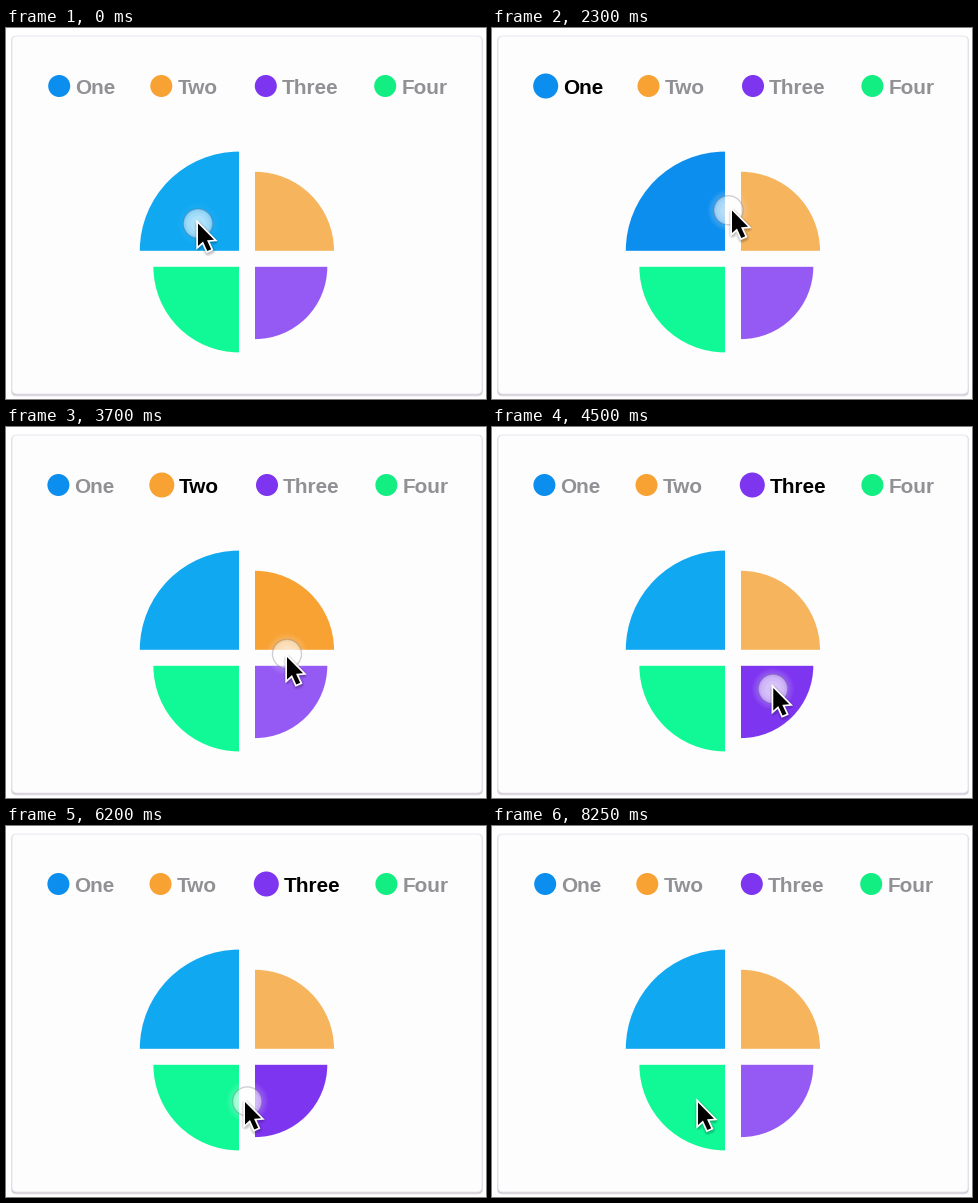
A matplotlib script that plays this animation: 480 by 371 pixels, repeating every 8.3 s.

```python
import numpy as np
import matplotlib.pyplot as plt
from matplotlib.animation import FuncAnimation
from matplotlib.colors import to_rgb
from matplotlib.patches import Circle, FancyBboxPatch, Polygon, Wedge

W, H, DPI = 480, 371, 100
STEP, LOOP = 50, 8300
PX = 72 / DPI  # points per pixel

GREY, BLACK = "#919094", "#000000"
CENTER, HALF_GAP = np.array([241, 230.8]), 8
LEGEND_Y, DOT, LABEL_GAP = 58, 11, 16
PRESS, RELEASE, FADE, LAG = 850, 7950, 300, 35

# label, soft colour, strong colour, slice radius, legend x; clockwise
ITEMS = [
    ("One", "#11a8f2", "#0c8eee", 99.2, 53.2),
    ("Two", "#f6b45c", "#f7a233", 79, 155.3),
    ("Three", "#965af4", "#7d35f0", 72.3, 259.8),
    ("Four", "#11f896", "#13ee82", 85.6, 379.2),
]

# time, x, y of the pointer; equal neighbours are rests
PATH = np.array([
    (0, 192, 195.5), (1850, 192, 195.5), (2300, 240, 182.5),
    (2850, 281, 211), (3400, 281, 211), (3700, 281, 230),
    (4000, 281, 262), (4450, 281, 262), (5000, 293, 220.5),
    (5200, 293, 220.5), (5700, 278, 258), (6200, 239, 276),
    (6900, 206, 276.5), (LOOP, 206, 276.5)])

ARROW = np.array([(0, 0), (0, 22.5), (5, 18), (9.3, 27.5), (13.2, 25.8),
                  (9, 16.8), (16, 16.2)])


def ease(u):
    u = min(max(u, 0), 1)
    return u * u * (3 - 2 * u)


def mix(a, b, u):
    return (1 - u) * np.array(to_rgb(a)) + u * np.array(to_rgb(b))


def velocity(i):
    """Path velocity at a key; zero at the ends and next to a rest."""
    if i in (0, len(PATH) - 1):
        return np.zeros(2)
    before, here, after = PATH[i - 1:i + 2]
    if (before[1:] == here[1:]).all() or (after[1:] == here[1:]).all():
        return np.zeros(2)
    return (after[1:] - before[1:]) / (after[0] - before[0])


def pointer(t):
    """Cubic Hermite curve through the path keys."""
    t = max(t, 0)
    i = min(np.searchsorted(PATH[:, 0], t, side="right") - 1, len(PATH) - 2)
    span = PATH[i + 1, 0] - PATH[i, 0]
    u = (t - PATH[i, 0]) / span
    blend = ease(u)
    return ((1 - blend) * PATH[i, 1:] + blend * PATH[i + 1, 1:]
            + u * (1 - u) ** 2 * span * velocity(i)
            - u * u * (1 - u) * span * velocity(i + 1))


def hovered(point):
    """Index of the quadrant under a point, None inside the gap."""
    dx, dy = point - CENTER
    if min(abs(dx), abs(dy)) < HALF_GAP:
        return None
    return int(dx > 0) if dy < 0 else 3 - int(dx > 0)


def find_picks():
    """Times at which the pointer enters a new slice, then the release."""
    picks, current = [], None
    for t in range(PRESS, RELEASE, STEP // 2):
        item = hovered(pointer(t))
        if item not in (None, current):
            picks.append((t, item))
            current = item
    return picks + [(RELEASE, None)]


PICKS = find_picks()


def weights(t):
    """How strongly each item is selected at time t."""
    w = np.zeros(len(ITEMS))
    for start, pick in PICKS:
        goal = np.arange(len(ITEMS)) == (-1 if pick is None else pick)
        w = w + ease((t - start) / FADE) * (goal - w)
    return w


fig = plt.figure(figsize=(W / DPI, H / DPI), dpi=DPI, facecolor="white")
ax = fig.add_axes([0, 0, 1, 1])
ax.set_xlim(0, W)
ax.set_ylim(H, 0)
ax.axis("off")


def card(grow, drop, color, alpha=1.0, edge="none"):
    ax.add_patch(FancyBboxPatch(
        (6 - grow, 8), 470 + 2 * grow, 358 + drop,
        boxstyle="round,pad=0,rounding_size=5",
        fc=color, ec=edge, lw=PX, alpha=alpha))


card(1, 2.5, "#b4acbc", 0.25)
card(0.5, 1.5, "#b4acbc", 0.6)
card(0, 0, "#fefdfe", edge="#ebe7ef")

slices, dots, labels = [], [], []
for i, (name, soft, strong, radius, x) in enumerate(ITEMS):
    side = np.array([1 if i in (1, 2) else -1, 1 if i > 1 else -1])
    start = (180 + 90 * i) % 360
    slices.append(ax.add_patch(Wedge(CENTER + HALF_GAP * side, radius,
                                     start, start + 90, ec="none")))
    dots.append(ax.add_patch(Circle((x, LEGEND_Y), DOT, fc=strong,
                                    ec="none")))
    labels.append(ax.text(x, LEGEND_Y + 7.7, name, size=20.8 * PX,
                          family="Liberation Sans", weight="bold"))


def disc(radius, alpha, **style):
    patch = ax.add_patch(Circle((0, 0), radius, zorder=5, **style))
    return patch, radius, alpha


WHITE = dict(fc="white", ec="none")
glow = [disc(r, 0.04, **WHITE) for r in np.linspace(21, 16, 5)]
touch = [disc(r, a, **WHITE) for r, a in ((14.5, 0.5), (11.5, 0.17), (8, 0.14))]
touch.append(disc(14.5, 0.3, fc="none", ec="#66667c", lw=1.4 * PX))


def arrow(color, **style):
    return ax.add_patch(Polygon(ARROW, fc=color, zorder=9, **style))


shadows = [arrow("black", ec="black", alpha=0.08, lw=w * PX,
                 joinstyle="round") for w in (3.5, 5.5, 7.5)]
arrows = [arrow("white", ec="white", lw=3.4 * PX, joinstyle="miter"),
          arrow("black", ec="none")]


def draw_items(w):
    for i, (_, soft, strong, _, x) in enumerate(ITEMS):
        # a selected entry widens and pushes its neighbours apart
        push = 1.2 * w[:i].sum() - 0.8 * w[i + 1:].sum()
        slices[i].set_facecolor(mix(soft, strong, w[i]))
        dots[i].center = (x + push + 0.5 * w[i], LEGEND_Y)
        dots[i].set_radius(DOT + 1.5 * w[i])
        labels[i].set_x(x + LABEL_GAP + push + 1.8 * w[i])
        labels[i].set_color(mix(GREY, BLACK, w[i]))


def draw_touch(t):
    fade = 1 - ease((t - RELEASE) / (FADE - STEP))
    warm = 0.25 + 0.75 * ease(t / 700)
    center = pointer(t - LAG)
    for group, level in ((glow, fade * warm), (touch, fade)):
        for patch, radius, alpha in group:
            patch.center = center
            patch.set_radius(radius * (0.7 + 0.3 * fade))
            patch.set_alpha(alpha * level)


def draw(frame):
    t = frame * STEP
    draw_items(weights(t))
    draw_touch(t)
    shape = ARROW + pointer(t)
    for patch in arrows:
        patch.set_xy(shape)
    for patch in shadows:
        patch.set_xy(shape + (0.5, 1.5))
    return []


anim = FuncAnimation(fig, draw, frames=LOOP // STEP, interval=STEP,
                     repeat=True, repeat_delay=0, blit=False)
plt.show()
```
